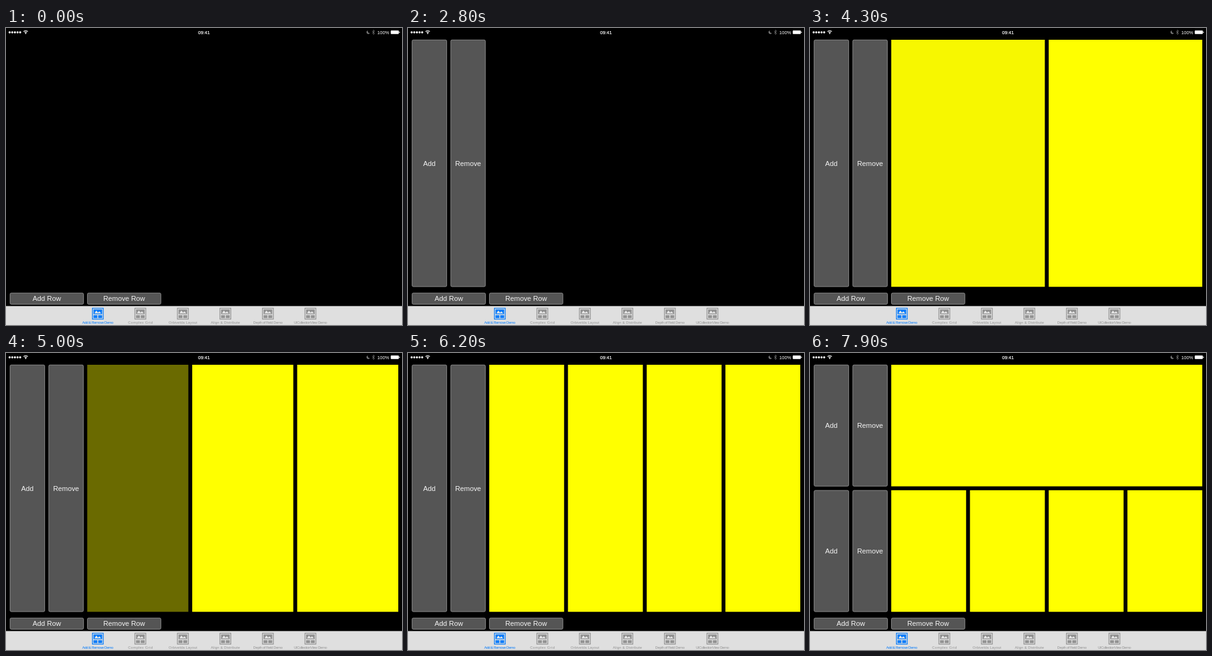
Animation of 640x480 px, one loop 8 s. Source, as an HTML page:

```html
<!DOCTYPE html>
<html lang="en">
<head>
<meta charset="utf-8">
<title>Add and remove rows</title>
<style>
  html, body { margin: 0; width: 100%; height: 100%; overflow: hidden; background: #000; }
  svg { display: block; width: 100vw; height: 100vh; }
  text { font-family: "Liberation Sans", Arial, sans-serif; text-anchor: middle; }
</style>
</head>
<body>
<svg id="stage" viewBox="0 0 640 480"></svg>
<script>
const LOOP = 8000;
const STEP = 250;   // make room, then fade in: one step each
const GAP = 6.25;
const AREA = { left: 131.3, right: 634, top: 19, bottom: 418.3 };

// Tap times; the first row sits at the bottom, the first cell at the right.
const ROWS = [
  { at: 330, cells: [2545, 3828, 4640, 5440] },
  { at: 6425, cells: [6945] }
];
const ROW_TAPS = ROWS.map(row => row.at);

const TABS = [
  ["Add & Remove Demo", -0.47],
  ["Complex Grid", 0.28],
  ["Orbivelda Layout", 0.06],
  ["Align & Distribute", 0.06],
  ["Depth of Field Demo", -0.42],
  ["UICollectionView Demo", -0.47]
];

const stage = document.getElementById("stage");

function add(parent, tag, attrs, content) {
  const node = document.createElementNS("http://www.w3.org/2000/svg", tag);
  set(node, attrs);
  if (content) node.textContent = content;
  parent.appendChild(node);
  return node;
}

function set(node, attrs) {
  for (const key in attrs) node.setAttribute(key, attrs[key]);
}

function makeButton(parent, label, x, width) {
  const box = add(parent, "rect", {
    x: x, width: width, rx: 2, fill: "#555", stroke: "#929292", "stroke-width": 0.9
  });
  const text = add(parent, "text", {
    x: x + width / 2, "font-size": 11.25, fill: "#f4f4f4"
  }, label);
  return (y, height) => {
    set(box, { y: y, height: height });
    set(text, { y: y + height / 2 + 4 });
  };
}

function drawStatusBar() {
  const bar = add(stage, "g", { fill: "#fff" });
  for (let i = 0; i < 5; i++) add(bar, "circle", { cx: 5.9 + i * 4.25, cy: 7, r: 1.7 });
  for (const r of [2.6, 4.8]) {
    const d = r * 0.72;
    add(bar, "path", {
      d: `M${31.8 - d} ${9.2 - d}A${r} ${r} 0 0 1 ${31.8 + d} ${9.2 - d}`,
      fill: "none", stroke: "#fff", "stroke-width": 1.2
    });
  }
  add(bar, "circle", { cx: 31.8, cy: 8.7, r: 1 });
  add(bar, "text", { x: 320, y: 9.6, "font-size": 7.5, stroke: "#fff", "stroke-width": 0.2 }, "09:41");
  add(bar, "path", { d: "M584.8 3.9A3 3 0 1 0 588.2 8.3A3.2 3.2 0 0 1 584.8 3.9Z", fill: "#777" });
  add(bar, "path", {
    d: "M591.8 5L595.8 8.7L593.8 10.5V3.3L595.8 5.1L591.8 8.8",
    fill: "none", stroke: "#888", "stroke-width": 0.7
  });
  add(bar, "text", { x: 609.7, y: 9.6, "font-size": 7.5 }, "100%");
  add(bar, "rect", { x: 621.8, y: 4, width: 13, height: 5.7, rx: 1 });
  add(bar, "rect", { x: 635.4, y: 5.8, width: 1, height: 2.2, rx: 0.5 });
}

function drawTabBar() {
  add(stage, "rect", { x: 0, y: 449.4, width: 640, height: 30.6, fill: "#dfdfdf" });
  TABS.forEach(([label, spacing], i) => {
    const x = 148.4 + i * 68.72;
    const color = i ? "#929292" : "#087cfa";
    const tab = add(stage, "g", { transform: `translate(${x} 452)`, fill: color });
    add(tab, "rect", {
      x: -8.8, y: 0.9, width: 17.6, height: 17.6,
      fill: "none", stroke: color, "stroke-width": 1.2
    });
    add(tab, "rect", { x: -7, y: 2.8, width: 14, height: 7.8 });
    add(tab, "path", { d: "M-5.5 9.2L-2.4 4.4L0.2 8L2.6 6L5.5 9.2Z", fill: "#e6e6e6" });
    add(tab, "rect", { x: -7, y: 12.2, width: 6.3, height: 4.6 });
    add(tab, "rect", { x: 0.7, y: 12.2, width: 6.3, height: 4.6 });
    add(tab, "text", { x: spacing / 2, y: 26, "font-size": 6, "letter-spacing": spacing }, label);
  });
}

const ease = p => {
  p = Math.min(1, Math.max(0, p));
  return p * p * (3 - 2 * p);
};

const fade = (t, tap) => ease((t - tap - STEP) / STEP);

// Item counted back from the far end, among `count` equal items.
function slot(index, count, start, end) {
  const size = (end - start - (count - 1) * GAP) / count;
  return { pos: end - (index + 1) * size - index * GAP, size: size };
}

// Each later tap moves the item into a layout with one more slot.
function place(index, taps, t, start, end) {
  let now = slot(index, index + 1, start, end);
  for (let k = index + 1; k < taps.length; k++) {
    const next = slot(index, k + 1, start, end);
    const p = ease((t - taps[k]) / STEP);
    now = {
      pos: now.pos + (next.pos - now.pos) * p,
      size: now.size + (next.size - now.size) * p
    };
  }
  return now;
}

drawStatusBar();
const views = ROWS.map(row => {
  const group = add(stage, "g", {});
  return {
    group: group,
    buttons: [makeButton(group, "Add", 6.6, 56), makeButton(group, "Remove", 69.1, 56)],
    cells: row.cells.map(() => add(group, "rect", { fill: "#ff0" }))
  };
});
makeButton(stage, "Add Row", 6.6, 118.7)(428.3, 18.2);
makeButton(stage, "Remove Row", 131.6, 118.7)(428.3, 18.2);
drawTabBar();

function render(t) {
  ROWS.forEach((row, r) => {
    const view = views[r];
    const band = place(r, ROW_TAPS, t, AREA.top, AREA.bottom);
    set(view.group, { opacity: fade(t, row.at) });
    view.buttons.forEach(layout => layout(band.pos + 0.3, band.size - 0.6));
    view.cells.forEach((cell, c) => {
      const col = place(c, row.cells, t, AREA.left, AREA.right);
      set(cell, {
        x: col.pos, y: band.pos, width: col.size, height: band.size,
        opacity: fade(t, row.cells[c])
      });
    });
  });
}

const origin = performance.now();
function tick() {
  render((performance.now() - origin) % LOOP);
  requestAnimationFrame(tick);
}
tick();
</script>
</body>
</html>
```
